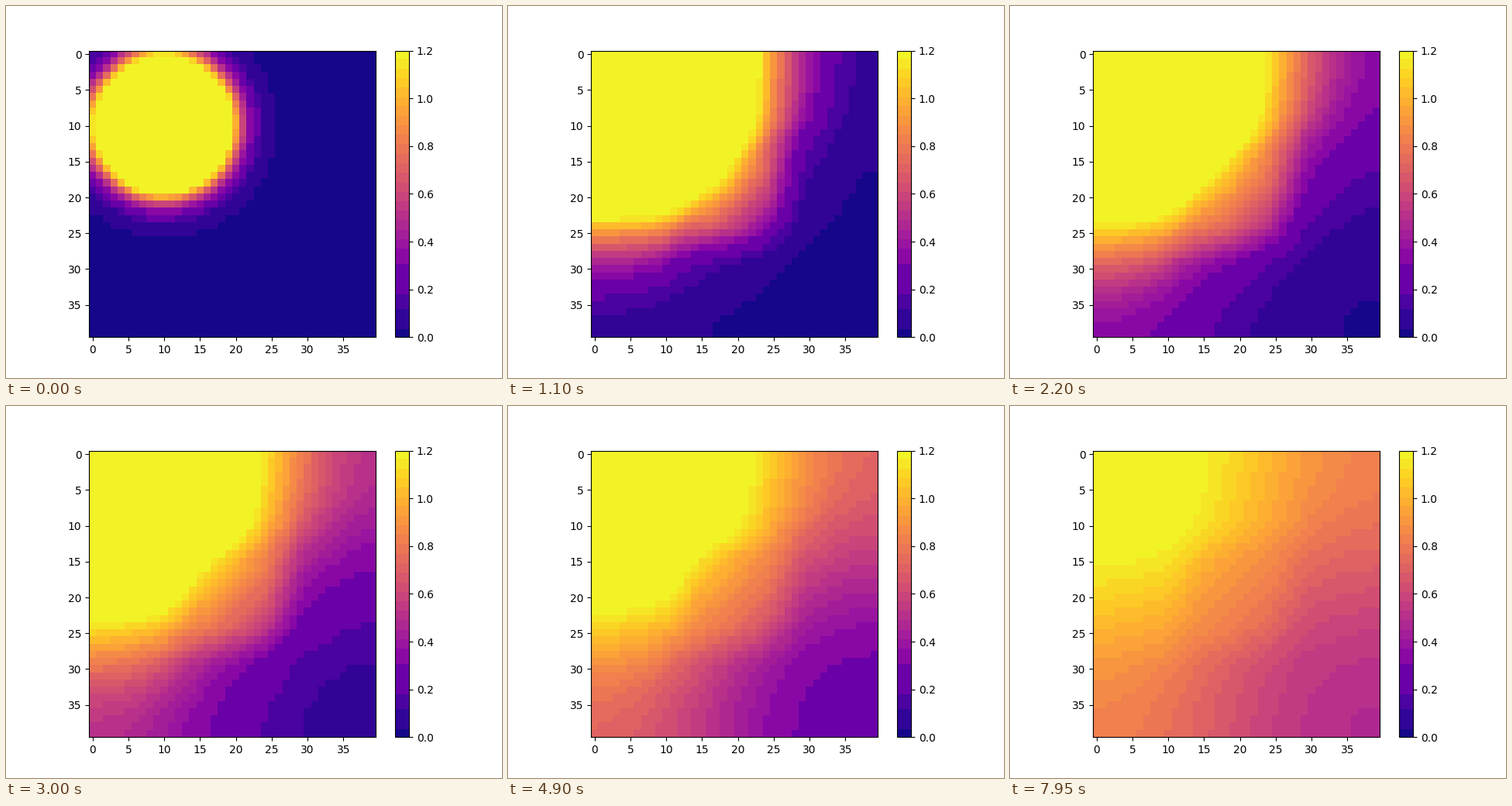
A matplotlib script for the animation above (8 s loop, 640 by 480 pixels).

```python
import numpy as np
import matplotlib.pyplot as plt
from matplotlib.animation import FuncAnimation
from matplotlib.colors import ListedColormap

N = 40
FRAMES = 160
STEP = 0.21        # diffusion number of one sub-step
SUBSTEPS = 10      # sub-steps per frame
WARMUP = 2         # sub-steps before the first frame
VMAX = 1.2


def diffusivity():
    """Fast medium with a slow square frame around a fast core."""
    d = np.ones((N, N))
    d[10:30, 10:30] = 0.4
    d[15:25, 15:25] = 1.0
    return d


def face_mean(a, b):
    return 2 * a * b / (a + b)


def advance(u, dx, dy):
    """One conservative explicit step with closed borders."""
    fx = STEP * dx * np.diff(u, axis=1)
    fy = STEP * dy * np.diff(u, axis=0)
    new = u.copy()
    new[:, :-1] += fx
    new[:, 1:] -= fx
    new[:-1] += fy
    new[1:] -= fy
    return new


def simulate():
    d = diffusivity()
    dx = face_mean(d[:, 1:], d[:, :-1])
    dy = face_mean(d[1:], d[:-1])
    y, x = np.mgrid[:N, :N]
    u = 11 * np.exp(-((x - 10) ** 2 + (y - 10) ** 2) / 41)
    for _ in range(WARMUP):
        u = advance(u, dx, dy)
    fields = [u]
    while len(fields) < FRAMES:
        for _ in range(SUBSTEPS):
            u = advance(u, dx, dy)
        fields.append(u)
    return fields


def banded_plasma(samples=480):
    """Plasma reduced to flat colour bands."""
    edges = np.concatenate([[0, 0.033, 0.117, 0.18, 0.305, 0.37],
                            np.linspace(0.41, 1.165, 20), [VMAX]])
    centres = (edges[:-1] + edges[1:]) / 2
    values = (np.arange(samples) + 0.5) / samples * VMAX
    band = np.searchsorted(edges, values) - 1
    return ListedColormap(plt.get_cmap("plasma")(centres[band] / VMAX))


fields = simulate()
fig, ax = plt.subplots(figsize=(6.4, 4.8), dpi=100)
image = ax.imshow(fields[0], cmap=banded_plasma(), vmin=0, vmax=VMAX,
                  interpolation="nearest")
fig.colorbar(image)


def update(n):
    image.set_data(fields[n])
    return (image,)


anim = FuncAnimation(fig, update, frames=FRAMES, interval=50, repeat=True)
plt.show()
```
